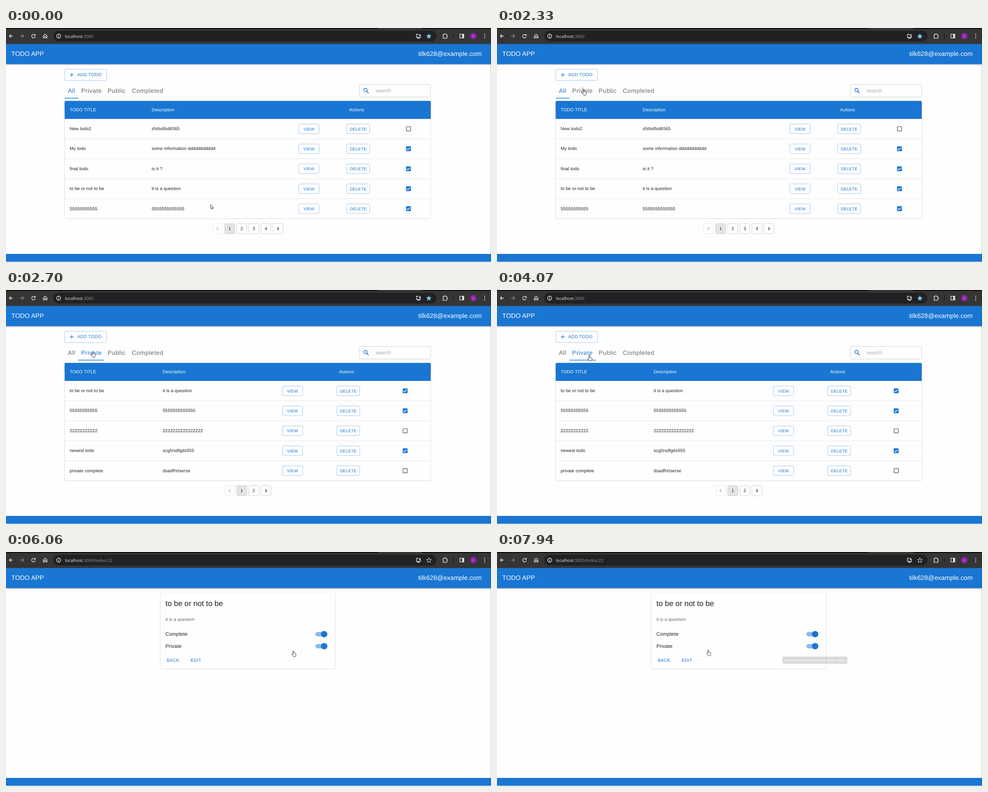
Write an HTML page that moves like this. It is 1077 by 520 pixels and loops after 8 s.

```html
<!DOCTYPE html>
<html lang="en">
<head>
<meta charset="utf-8">
<title>Todo app</title>
<style>
html, body { margin: 0; width: 100%; height: 100%; overflow: hidden; background: #fefefe; }
svg { display: block; width: 1077px; height: 520px; }
text { font: 9.87px "Liberation Sans", Arial, sans-serif; letter-spacing: .0107em; fill: #212121; white-space: pre; text-rendering: geometricPrecision; }
.mid { text-anchor: middle; }
.blue { fill: #1976d2; }
.white { fill: #fff; }
.gray { fill: #666; }
.head { font-size: 14.1px; letter-spacing: .0075em; fill: #fff; }
.btn { fill: #1976d2; letter-spacing: .0286em; }
.small { font-size: 9.17px; }
.tab { font-size: 13.4px; letter-spacing: .6px; fill: #666; }
.body { font-size: 11.28px; letter-spacing: .0094em; }
.title { font-size: 16.92px; letter-spacing: 0; }
.tip { font-size: 7.46px; letter-spacing: 0; fill: #fff; }
.url { font: 9.35px "Open Sans", "Noto Sans", sans-serif; letter-spacing: 0; fill: #eee; }
.box { fill: none; stroke: #8cbae8; stroke-width: .8; }
.edge { fill: none; stroke: #c4c4c4; stroke-width: .8; }
.icon { fill: none; stroke: #e8e8e8; stroke-width: 1.3; }
.paper { fill: #fefefe; filter: drop-shadow(0 .9px .7px rgba(0,0,0,.32)) drop-shadow(0 .4px 1px rgba(0,0,0,.14)); }
.bar { filter: drop-shadow(0 1.6px 1.8px rgba(0,0,0,.36)); }
.cursor { fill: #fff; stroke: #222; stroke-width: .85; stroke-linejoin: round; }
</style>
</head>
<body>
<svg id="stage" viewBox="0 0 1077 520"></svg>
<script>
const text = (x, y, s, cls = '', more = '') => `<text x="${x}" y="${y}" class="${cls}" ${more}>${s}</text>`;
const rect = (x, y, w, h, more = '', r = 0) => `<rect x="${x}" y="${y}" width="${w}" height="${h}" rx="${r}" ${more}/>`;
const path = (d, more = 'class="icon"') => `<path d="${d}" ${more}/>`;
const circle = (x, y, r, more) => `<circle cx="${x}" cy="${y}" r="${r}" ${more}/>`;
const group = (id, content) => `<g id="${id}">${content}</g>`;

const star = Array.from({ length: 10 }, (_, i) => {
  const a = (i / 5 - .5) * Math.PI, r = i % 2 ? 2.6 : 5.8;
  return `${(939 + r * Math.cos(a)).toFixed(2)} ${(18.6 + r * Math.sin(a)).toFixed(2)}`;
}).join('L');

const browser =
  rect(0, 0, 1077, 35.5, 'fill="#353535"') +
  rect(0, 0, 1077, 1.7, 'fill="#050505"') +
  path('M818 2Q825 2 828 0H922Q925 2 931 2Z', 'fill="#353535"') +
  rect(105, 6, 851, 24, 'fill="#202123"', 12) +
  path('M15 18H7.5M11 14.3L7.3 18L11 21.7') +
  path('M31.5 18H39M35.5 14.3L39.2 18L35.5 21.7', 'class="icon" style="stroke:#888"') +
  path('M64.3 15.6A4 4 0 1 0 65 19M65 13.6V16.4H62') +
  path('M83 17.3L87 13.8L91 17.3V22.2H88.5V19H85.5V22.2H83Z') +
  circle(117, 18, 4.5, 'class="icon"') +
  path('M117 17.3V20.7M117 15.1V16.3') +
  path('M916 14H911.5V21H920.5V18.5M913.5 23H918.5M919 13V17.5M916.8 15.6L919 17.8L921.2 15.6') +
  path('M970.5 14.3H973A1.6 1.6 0 0 1 976.2 14.3H978.7V17A1.6 1.6 0 0 1 978.7 20.2V22.8H970.5V20A1.6 1.6 0 0 0 970.5 17Z') +
  path('M993.5 13V24', 'stroke="#151515" stroke-width="1.2"') +
  rect(1007.8, 13.8, 8.8, 8.4, 'class="icon"') +
  rect(1013, 14, 4, 8, 'fill="#e8e8e8"') +
  circle(1037.7, 18, 7.2, 'fill="#8e24aa"') +
  text(1037.7, 20.8, 'I', 'white mid', 'style="font-size:8px"') +
  [13.8, 18, 22.2].map(y => circle(1063, y, 1.1, 'fill="#e8e8e8"')).join('') +
  `<text x="131" y="21.5" class="url">localhost<tspan fill="#999" id="route"></tspan></text>` +
  path(`M${star}Z`, 'id="star" stroke-linejoin="round"');

const frame =
  rect(0, 35, 1077, 45.3, 'class="blue bar"') +
  text(11.7, 62.2, 'TODO APP', 'head') +
  text(915.5, 62.2, 'tilk628@example.com', 'head') +
  rect(0, 502, 1077, 17.4, 'class="blue"') +
  rect(1076, 35, 1, 485, 'fill="#000" opacity=".22"');

const tools =
  rect(130.5, 91.7, 92.8, 25, 'class="box"', 2.8) +
  path('M141.8 104.1H150.2M145.9 99.9V108.3', 'stroke="#1976d2" stroke-width="1.2"') +
  text(158.2, 107.4, 'ADD TODO', 'btn') +
  text(137.4, 144, 'All', 'tab', 'id="tabAll"') +
  text(166.9, 144, 'Private', 'tab', 'id="tabPrivate"') +
  text(225.8, 144, 'Public', 'tab') +
  text(279.4, 144, 'Completed', 'tab') +
  `<clipPath id="clip">${rect(161, 122, 58.5, 35)}</clipPath>` +
  `<g clip-path="url(#clip)">${circle(190.5, 135, 0, 'id="ripple" class="blue"')}</g>` +
  rect(130, 155.1, 31, 1.4, 'class="blue" id="underline"') +
  rect(784.7, 125.4, 158.2, 28, 'class="edge"', 2.8) +
  circle(798.2, 137.7, 3.7, 'fill="none" stroke="#1976d2" stroke-width="1.5"') +
  path('M801 140.5L805 144.5', 'stroke="#1976d2" stroke-width="1.8"') +
  text(820.7, 143.2, 'search', 'body', 'style="fill:#aaa"');

const check = (x, y, on) => on
  ? rect(x - 5.4, y - 5.4, 10.8, 10.8, 'class="blue"', 1.4) +
    path(`M${x - 3.6} ${y}l2.3 2.4l4.9 -4.9`, 'fill="none" stroke="#fff" stroke-width="1.4"')
  : rect(x - 4.7, y - 4.7, 9.4, 9.4, 'fill="none" stroke="#666" stroke-width="1.4"', .8);

function table(id, [desc, view, del, actions, box], rows) {
  let s = rect(130.3, 162, 812.9, 261.6, 'class="paper"', 2.8) +
    rect(130.3, 162, 812.9, 20, 'class="blue"', 2.8) +
    rect(130.3, 166, 812.9, 36, 'class="blue"') +
    text(141.5, 185.3, 'TODO TITLE', 'white') +
    text(desc, 185.3, 'Description', 'white') +
    text(actions, 185.3, 'Actions', 'white');
  rows.forEach(([name, info, done], i) => {
    const y = 224.1 + 44.35 * i;
    s += text(141.5, y + 3, name) + text(desc, y + 3, info) +
      rect(view, y - 10.7, 45.2, 21.4, 'class="box"' + (i ? '' : ` id="${id}View"`), 2.8) +
      text(view + 22.7, y + 3.6, 'VIEW', 'btn small mid') +
      rect(del, y - 10.7, 51.2, 21.4, 'class="box"', 2.8) +
      text(del + 25.7, y + 3.6, 'DELETE', 'btn small mid') +
      check(box, y, done);
    if (i < 4) s += rect(130.3, y + 22, 812.9, .8, 'fill="#e0e0e0"');
  });
  return s;
}

function pager(count) {
  const step = 26.8, first = 537 - step * (count + 1) / 2;
  let s = '';
  for (let i = 0; i < count + 2; i++) {
    const x = first + step * i, end = i > count, dir = end ? 1 : -1;
    s += rect(x - 11.2, 434.8, 22.4, 22.4, `class="edge" style="${i == 1 ? 'fill:#e4e4e4' : i ? '' : 'stroke:#e4e4e4'}"`, 2.8) +
      (i && !end
        ? text(x, 449.4, i, 'mid')
        : path(`M${x - 1.5 * dir} 443l${3 * dir} 3l${-3 * dir} 3`,
            `fill="none" stroke="${end ? '#222' : '#aaa'}" stroke-width="1.4"`));
  }
  return s;
}

const quote = ['to be or not to be', 'it is a question', true];
const fives = ['5'.repeat(11), '5'.repeat(13), true];
const allList = table('all', [323.5, 650.2, 756.4, 762, 893.8], [
  ['New todo2', 'sfsfsdfsd6565', false],
  ['My todo', 'some information ddddddddddd', true],
  ['final todo', 'is it ?', true],
  quote, fives
]) + pager(4);
const privateList = table('private', [348, 613.5, 734.4, 740, 886.4], [
  quote, fives,
  ['2'.repeat(11), '2'.repeat(16), false],
  ['newest todo', 'scgfzsdfgds555', true],
  ['private complete', 'dsadfhrtserse', false]
]) + pager(2);

const toggle = y =>
  rect(687, y - 4.9, 24, 9.8, 'fill="#8bbae8"', 4.9) +
  circle(706.5, y, 7.1, 'class="blue"');
const detail =
  rect(342.8, 92, 388, 167.6, 'class="paper"', 2.8) +
  text(354, 119.6, quote[0], 'title') +
  text(354, 153, quote[1], 'gray') +
  text(354, 186.3, 'Complete', 'body') + toggle(182.6) +
  text(354, 213.3, 'Private', 'body') + toggle(209.3) +
  text(357, 244.3, 'BACK', 'btn') +
  text(410, 244.3, 'EDIT', 'btn') +
  group('tip', rect(634, 232.5, 144, 16, 'fill="#616161" fill-opacity=".92"', 2.8) +
    text(639.5, 242.8, 'Click the edit button to change the value', 'tip'));

const $ = id => document.getElementById(id);
$('stage').innerHTML = rect(0, 0, 1077, 520, 'fill="#fefefe"') + frame + browser +
  group('tools', tools) + group('all', allList) + group('private', privateList) +
  group('loader', rect(548.2, 204.6, 2.6, 1, 'fill="#1976d2" opacity=".8"')) +
  group('detail', detail) +
  path('M.5 .5V9.6L2.6 7.7L4 10.7L5.3 10.1L4 7.1H6.7Z', 'class="cursor" id="arrow"') +
  path('M3.2 8.8V1.5Q3.2 .5 4.1 .5T5 1.5V5.5Q6 4.9 6.6 5.8Q7.6 5.2 8.2 6.2Q9.8 5.8 9.8 7.2V10Q9.8 11.6 8.8 12.5V13.6H4.1V12.6L1 9.4Q.1 8.2 .9 7.8Q1.8 7.4 3.2 8.8Z', 'class="cursor" id="hand"');

// Pointer moves: first step, last step, number of steps, final left and top
const moves = [
  [380, 860, 5, 126, 137],
  [1010, 1250, 3, 141, 139],
  [1780, 1910, 2, 199, 139],
  [2190, 2190, 1, 188.5, 136],
  [3250, 3540, 3, 200, 144],
  [4070, 4070, 1, 201, 144],
  [4190, 4190, 1, 211, 144],
  [4340, 4700, 4, 262, 140],
  [4840, 4970, 2, 185, 218],
  [5120, 5250, 2, 669, 230],
  [5390, 5640, 3, 635, 219],
  [5790, 5790, 1, 634, 219],
  [6980, 6980, 1, 620.5, 217],
  [7280, 7400, 2, 701, 210],
  [7820, 7940, 2, 465, 217]
];

function pointer(t) {
  let x = 454, y = 392;
  for (const [from, to, count, endX, endY] of moves) {
    if (t < from) break;
    const gap = (to - from) / (count - 1) || 1;
    const part = Math.min(count, Math.floor((t - from) / gap + 1.001)) / count;
    x += (endX - x) * part;
    y += (endY - y) * part;
  }
  return [x, y];
}

const clamp = v => Math.min(1, Math.max(0, v));
const ease = v => 1 - (1 - v) ** 2.2;
const show = (id, on) => { $(id).style.display = on ? '' : 'none'; };
const fill = (id, color) => { $(id).style.fill = color; };
const refresh = [0, 2330, 2460, 2580, 2700, 2840, 7280, 7400, 7520, 7820, 7940];

function draw(now) {
  const time = now % 8000;
  const t = refresh.filter(s => s <= time).pop();
  const opened = time >= 6060, picked = t >= 2460;
  show('tools', !opened);
  show('all', !picked);
  show('loader', picked && t < 2580);
  show('private', t >= 2580 && !opened);
  show('detail', opened);

  $('route').textContent = opened ? ':3000/todos/22' : ':3000';
  $('star').setAttribute('style', opened
    ? 'fill:none;stroke:#e8e8e8;stroke-width:1'
    : 'fill:#70d0f0;stroke:#70d0f0;stroke-width:.6');
  fill('tabAll', picked ? '#666' : '#1976d2');
  fill('tabPrivate', picked ? '#1976d2' : '#666');

  const slide = ease(clamp((t - 2460) / 300));
  $('underline').setAttribute('x', 130.2 + 30.6 * slide);
  $('underline').setAttribute('width', 30.6 + 28 * slide);
  const wave = clamp((t - 2300) / 400);
  $('ripple').setAttribute('r', 3 + 32 * wave ** 1.8);
  $('ripple').style.opacity = t >= 2330 ? .28 * (1 - wave) ** .8 : 0;

  $('privateView').setAttribute('style', time >= 5390 ? 'fill:#f4f8fd;stroke:#1976d2' : '');
  $('tip').style.opacity = clamp((t - 7280) / 240) * (1 - clamp((t - 7820) / 160));

  const hand = time >= 1130 && (time < 4840 || time >= 5390);
  show('hand', hand);
  show('arrow', !hand);
  $(hand ? 'hand' : 'arrow').setAttribute('transform', `translate(${pointer(time)})`);
}

const start = performance.now();
function loop() {
  draw(performance.now() - start);
  requestAnimationFrame(loop);
}
loop();
</script>
</body>
</html>
```
